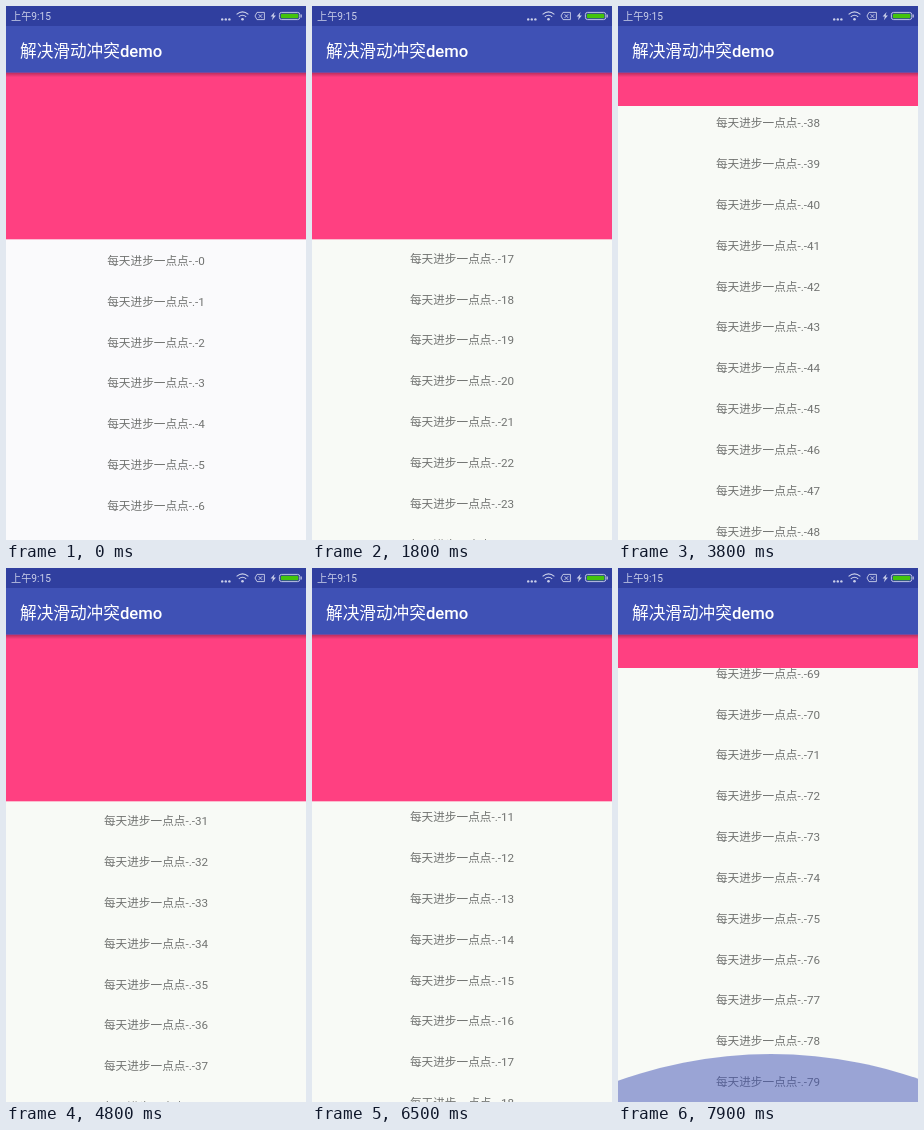
Write an HTML page that moves like this. It is 300 px wide and 534 px high and loops after 8000 ms.

```html
<!DOCTYPE html>
<html lang="zh-CN">
<head>
<meta charset="utf-8">
<title>demo</title>
<style>
  html, body { margin: 0; width: 100%; height: 100%; overflow: hidden; background: #f8faf6; }
  svg { display: block; width: 300px; height: 534px; }
  text { font-family: Roboto, "Noto Sans CJK SC", "Noto Sans CJK", sans-serif; }
  #rows text { font-size: 11.67px; fill: #717371; text-anchor: middle; }
  .title { font-size: 16.67px; fill: #fff; }
  .title tspan { font-weight: 500; }
  .clock { font-size: 10.2px; fill: #ccd1ea; }
</style>
</head>
<body>
<svg viewBox="0 0 300 534">
  <defs>
    <linearGradient id="shade" x2="0" y2="1">
      <stop offset="0" stop-color="#000" stop-opacity=".28"/>
      <stop offset="1" stop-color="#000" stop-opacity="0"/>
    </linearGradient>
  </defs>
  <rect id="page" width="300" height="534"/>
  <g id="rows"></g>
  <circle id="topGlow" cx="150" r="450" fill="#3f51b5"/>
  <circle id="endGlow" cx="153" r="450" fill="#3f51b5"/>
  <rect id="head" y="60" width="300" fill="#ff4081"/>
  <rect y="66.67" width="300" height="4.5" fill="url(#shade)"/>
  <rect width="300" height="66.67" fill="#3f51b5"/>
  <rect width="300" height="20" fill="#303f9f"/>
  <text class="title" x="14" y="50.7">解决滑动冲突<tspan>demo</tspan></text>
  <text class="clock" x="5" y="14.4">上午9:15</text>
  <g fill="#ccd1ea">
    <circle cx="216.2" cy="13.4" r="1.2"/>
    <circle cx="219.8" cy="13.4" r="1.2"/>
    <circle cx="223.4" cy="13.4" r="1.2"/>
    <circle cx="236.5" cy="13.3" r="1.3"/>
    <path d="M268.6 6l-4 4.6h2.3l-1 3.6 4-4.8h-2.3z"/>
  </g>
  <g fill="none" stroke="#ccd1ea" stroke-width="1.1">
    <path d="M230.6 8.4q5.9-5 11.8 0M232.8 10.9q3.7-3.2 7.4 0"/>
    <path d="M249 10l2-3.6h7.4v7.2H251zM252.6 8.3l3.6 3.6m0-3.6l-3.6 3.6" stroke-width=".9"/>
    <rect x="273.4" y="6.4" width="20.4" height="7.2" rx="2.2" stroke-width=".9"/>
    <path d="M295.2 8.6v2.8"/>
  </g>
  <rect x="274.8" y="7.7" width="17.6" height="4.6" rx="1.2" fill="#43c40c"/>
</svg>
<script>
const LOOP = 8000, STEP = 100, ROW = 40.8333, COUNT = 80;
const OPEN = 233.33, SHUT = 100, BOTTOM = 534, RADIUS = 450;
const END = 2833.3, OPEN_END = END + OPEN - SHUT;
const $ = id => document.getElementById(id);

// [time, value] steps
const scroll = [[1100, 0], [1300, 180], [1500, 410], [1800, 696.2], [2000, 830],
  [2200, 1130], [2400, 1930], [2600, END], [3000, END], [3200, 2540], [3500, 1900],
  [3800, 1556], [4400, 1556], [4600, 1390], [4800, 1267.5], [5000, 960], [5200, 420],
  [5400, 0], [5800, 0], [6100, 170], [6500, 454.7], [6700, 1000], [7000, 2100],
  [7300, OPEN_END], [7500, OPEN_END], [7800, END]];
const header = [[2000, OPEN], [2300, SHUT], [3900, SHUT], [4400, OPEN],
  [7500, OPEN], [7800, SHUT]];
const endPull = [[2700, 0], [2900, 38], [3200, 0], [7200, 0], [7300, 20], [7500, 0],
  [7700, 0], [7900, 48]];
const topPull = [[5300, 0], [5500, 38], [5700, 28], [5900, 0]];

function at(table, t) {
  const i = table.findIndex(p => p[0] > t);
  if (i === 0) return table[0][1];
  if (i < 0) return table[table.length - 1][1];
  const [t0, v0] = table[i - 1], [t1, v1] = table[i];
  return v0 + (v1 - v0) * (t - t0) / (t1 - t0);
}

function glow(id, pull, cy) {
  $(id).setAttribute('cy', cy);
  $(id).setAttribute('opacity', 0.5 * Math.min(1, pull / 40));
}

const rows = [];
for (let i = 0; i < COUNT; i++) {
  const row = document.createElementNS('http://www.w3.org/2000/svg', 'text');
  row.textContent = '每天进步一点点-.-' + i;
  row.setAttribute('x', 150);
  $('rows').append(row);
  rows.push(row);
}

function draw(t) {
  const h = at(header, t), s = at(scroll, t);
  rows.forEach((row, i) => {
    const y = h + 25.5 + ROW * i - s;
    const seen = y > h - 10 && y < BOTTOM + 15;
    row.setAttribute('display', seen ? 'inline' : 'none');
    if (seen) row.setAttribute('y', y.toFixed(2));
  });
  $('head').setAttribute('height', h - 60);
  const up = at(endPull, t), down = at(topPull, t);
  glow('endGlow', up, BOTTOM - up + RADIUS);
  glow('topGlow', down, h + down - RADIUS);
  const k = Math.min(1, t / 900);
  $('page').setAttribute('fill', `rgb(${250 - 2 * k},250,${252 - 6 * k})`);
}

const start = performance.now();
function tick(now) {
  const t = Math.max(0, now - start) % LOOP;
  draw(Math.floor(t / STEP) * STEP);
  requestAnimationFrame(tick);
}
draw(0);
requestAnimationFrame(tick);
</script>
</body>
</html>
```
